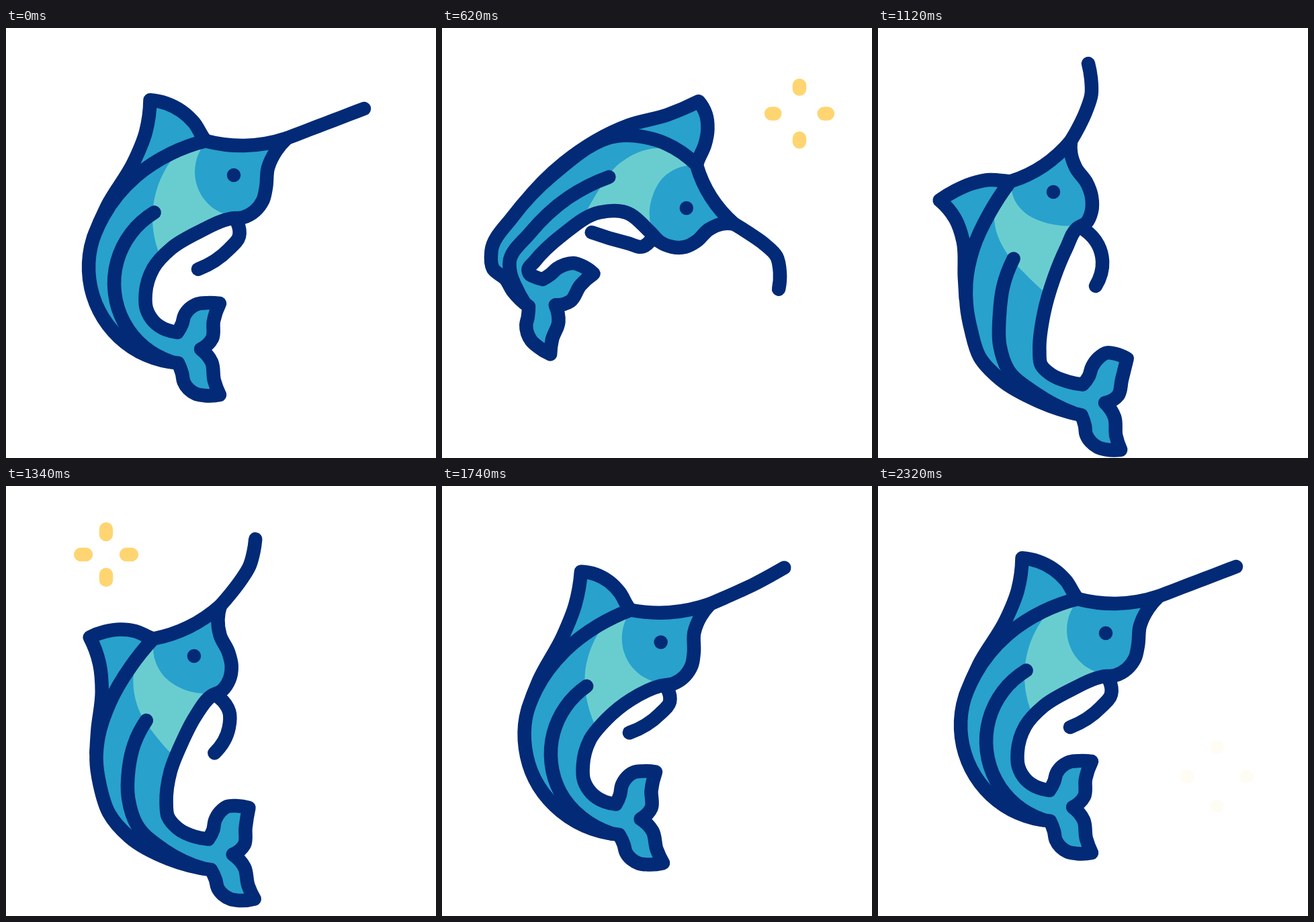
An HTML page with a canvas for the animation above (2.4 s loop, 640 by 640 pixels).

```html
<!DOCTYPE html>
<html lang="en">
<head>
<meta charset="utf-8">
<title>Leaping marlin</title>
<style>
  html, body { margin: 0; width: 100%; height: 100%; overflow: hidden; background: #fff; }
  canvas { display: block; width: 640px; height: 640px; }
</style>
</head>
<body>
<canvas id="stage" width="640" height="640"></canvas>
<script>
const NAVY = '#032a76', BLUE = '#28a1cd', CYAN = '#69cdd0', YELLOW = '#ffd572';
const LOOP = 2400, STEP = 20, LAST = 2320, STROKE = 20.5;
const PIVOT = [230, 360];
const ctx = document.getElementById('stage').getContext('2d');

const rad = deg => deg * Math.PI / 180;
const clamp = u => Math.max(0, Math.min(1, u));

function rotate([x, y], deg, [cx, cy] = [0, 0]) {
  const c = Math.cos(rad(deg)), s = Math.sin(rad(deg));
  return [cx + (x - cx) * c - (y - cy) * s, cy + (x - cx) * s + (y - cy) * c];
}

const spread = (n, f) => Array.from({ length: n }, (_, i) => f(i / (n - 1)));
const arc = (cx, cy, r, from, to, n = 5) => spread(n, u => {
  const a = rad(from + (to - from) * u);
  return [cx + r * Math.cos(a), cy + r * Math.sin(a)];
});

// The fish at rest: centre lines built from arcs and a few points.
const snout = [418, 164];
const shape = {
  brow: [[355, 175], [297, 168]],
  back: [[245, 187], [193, 221], ...arc(266, 356, 143, 212, 94, 7)],
  low: [...arc(295, 514, 33, 180, 90), [318, 546]],
  lowIn: [[310, 525], [306, 497], [290, 478]],
  upIn: [[307, 462], [309, 436], [318, 410]],
  up: [...arc(296, 443, 34, 275, 185), [255, 453]],
  belly: [...arc(255, 404, 48, 110, 190, 4), [219, 358], [246, 328], [288, 303],
    ...arc(339, 236, 48, 96, 2), [390, 208], [402, 183], snout],
  nose: spread(6, u => [418 + 115 * u, 164 - 44 * u]),
  finFront: arc(208, 200, 93, -24, -86),
  finRear: [[208, 155], [190, 200], [150, 266], [130, 312]],
  pec: [[344, 289], [347, 310], [332, 329], [286, 359]],
  side: arc(284, 380, 123, 239, 108, 7),
  band: arc(364, 283, 146, 224, 156),
  gill: arc(348, 214, 67, 98, 222, 6)
};

// Rigid groups around the eye and the tail notch.
const HEAD = [[0, 0], [-42, -51], [-4, 65], [48, 16]];
const TAIL = [[0, 0], [28, 68], [28, -68], [-34, -24], [-34, 21]];

// A pose is a set of pins, with the turn of head and tail in degrees.
const pose = (turns, ...pins) => ({ turns, pins });
const body = (...pins) => pins;

const rest = pose([0, 0], [339, 219], [290, 478],
  ...body([180, 232], [123, 356], [167, 460], [246, 328], [208, 400]),
  [215, 107], [286, 359], snout, [495, 135], [533, 120]);
const dive = pose([59, 29], [364, 274], [165, 397],
  ...body([250, 157], [80, 312], [92, 366], [223, 267], [131, 335]),
  [404, 113], [215, 292], [432, 306], [495, 375], [489, 420]);
const lift = pose([35, 26], [353, 247], [182, 445],
  ...body([208, 184], [86, 338], [98, 398], [240, 290], [143, 383]),
  [316, 97], [237, 328], [428, 248], [500, 273], [510, 303]);
const rise = pose([-37, 4], [261, 244], [338, 558],
  ...body([137, 340], [136, 435], [180, 522], [262, 372], [241, 485]),
  [92, 256], [324, 384], [287, 168], [319, 91], [313, 53]);
const sink = pose([-18, -11], [297, 264], [328, 539],
  ...body([157, 325], [132, 420], [176, 521], [256, 391], [231, 470]),
  [158, 198], [292, 400], [350, 194], [408, 140], [429, 107]);

// The last few pins are the fin tips and the nose.
const withTips = (p, ...tips) => pose(p.turns, ...p.pins.slice(0, -tips.length), ...tips);
const settle = withTips(rest, [227, 104], [279, 354], [418, 167], [496, 141], [535, 126]);
settle.turns = [0, -2];
const apex = withTips(
  pose(rise.turns.map(a => a - 3), ...rise.pins.map(p => rotate(p, -3, [330, 600]))),
  [265, 170], [284, 82], [286, 34]);

// Pins are blended in the frame of the head, so that the body swings in arcs.
const keys = [
  [0, rest], [120, rest], [360, dive], [860, lift], [1060, apex], [1120, rise],
  [1560, sink], [1840, settle], [2000, settle], [2280, rest], [LOOP, rest]
].map(([t, { turns, pins }]) => ({
  t, v: [...turns, ...pins.flatMap(p => rotate(p, -turns[0], PIVOT))]
}));

// Monotone slopes: smooth through the keys, no overshoot.
keys.forEach((k, i) => {
  const p = keys[i - 1], n = keys[i + 1];
  k.m = k.v.map((v, j) => {
    if (!p || !n) return 0;
    const h0 = k.t - p.t, h1 = n.t - k.t;
    const d0 = (v - p.v[j]) / h0, d1 = (n.v[j] - v) / h1;
    return d0 * d1 <= 0 ? 0 : 3 * (h0 + h1) / ((2 * h1 + h0) / d0 + (h1 + 2 * h0) / d1);
  });
});

function poseAt(t) {
  const i = keys.findIndex(k => k.t > t);
  const a = keys[i - 1], b = keys[i], h = b.t - a.t, u = (t - a.t) / h;
  const w = u * u * (3 - 2 * u), wa = u * (1 - u) * (1 - u) * h, wb = u * u * (u - 1) * h;
  const mix = a.v.map((v, j) => v + (b.v[j] - v) * w + a.m[j] * wa + b.m[j] * wb);
  const pins = [];
  for (let j = 2; j < mix.length; j += 2) pins.push(rotate([mix[j], mix[j + 1]], mix[0], PIVOT));
  return pose(mix.slice(0, 2), ...pins);
}

function handles({ turns, pins: [eye, notch, ...loose] }) {
  const rigid = (group, [x, y], deg) => group.map(([dx, dy]) => rotate([x + dx, y + dy], deg, [x, y]));
  return [...rigid(HEAD, eye, turns[0]), ...rigid(TAIL, notch, turns[1]), ...loose];
}

// Gauss-Jordan elimination; each row ends with two right-hand sides.
function solve(rows) {
  const n = rows.length;
  for (let c = 0; c < n; c++) {
    let best = c;
    for (let r = c + 1; r < n; r++) if (Math.abs(rows[r][c]) > Math.abs(rows[best][c])) best = r;
    [rows[c], rows[best]] = [rows[best], rows[c]];
    for (let r = 0; r < n; r++) {
      if (r === c) continue;
      const f = rows[r][c] / rows[c][c];
      for (let k = c; k < n + 2; k++) rows[r][k] -= f * rows[c][k];
    }
  }
  return rows.map((row, i) => [row[n] / row[i], row[n + 1] / row[i]]);
}

// Thin-plate spline that carries the handles from one place to another.
function warp(from, to) {
  const basis = ([x, y]) => [...from.map(([px, py]) => {
    const d = (x - px) ** 2 + (y - py) ** 2;
    return d ? d * Math.log(d) : 0;
  }), 1, x, y];
  const flat = f => [...from.map(f), 0, 0, 0, 0, 0];
  const weights = solve([
    ...from.map((p, i) => [...basis(p), ...to[i]]),
    flat(() => 1), flat(p => p[0]), flat(p => p[1])
  ]);
  return p => basis(p).reduce(([x, y], b, i) =>
    [x + b * weights[i][0], y + b * weights[i][1]], [0, 0]);
}

// Adds a smooth curve through the points; the path is already at the first one.
function curve(path, pts) {
  const n = pts.length - 1, d = [], v = [], m = [];
  for (let i = 0; i < n; i++) {
    const x = pts[i + 1][0] - pts[i][0], y = pts[i + 1][1] - pts[i][1];
    d[i] = Math.hypot(x, y) || 1;
    v[i] = [x / d[i], y / d[i]];
  }
  for (let i = 1; i < n; i++)
    m[i] = [0, 1].map(c => (v[i - 1][c] * d[i] + v[i][c] * d[i - 1]) / (d[i - 1] + d[i]));
  m[0] = [0, 1].map(c => 2 * v[0][c] - m[1][c]);
  m[n] = [0, 1].map(c => 2 * v[n - 1][c] - m[n - 1][c]);
  for (let i = 0; i < n; i++) {
    const p = pts[i], q = pts[i + 1], s = d[i] / 3;
    path.bezierCurveTo(p[0] + m[i][0] * s, p[1] + m[i][1] * s,
      q[0] - m[i + 1][0] * s, q[1] - m[i + 1][1] * s, q[0], q[1]);
  }
}

// Joins runs of points with corners between them.
function trace(start, ...runs) {
  const path = new Path2D();
  path.moveTo(...start);
  for (const run of runs) {
    curve(path, [start, ...run]);
    start = run[run.length - 1];
  }
  return path;
}

const line = ([first, ...others]) => trace(first, others);

function fill(path, color) {
  ctx.fillStyle = color;
  ctx.fill(path);
}

const restHandles = handles(rest);

function drawFish(now) {
  const move = warp(restHandles, handles(now));
  const p = {};
  for (const part in shape) p[part] = shape[part].map(move);

  const outline = trace(p.nose[0], p.brow, p.back, p.low, p.lowIn, p.upIn, p.up, p.belly);
  outline.closePath();
  const fin = trace(p.brow[1], p.finFront, p.finRear);
  const band = line(p.band);
  band.lineTo(...p.gill[0]);
  curve(band, p.gill);

  ctx.lineWidth = STROKE;
  ctx.strokeStyle = NAVY;
  fill(fin, BLUE);
  ctx.stroke(fin);
  fill(outline, BLUE);
  ctx.save();
  ctx.clip(outline);
  fill(band, CYAN);
  ctx.restore();
  for (const path of [outline, line(p.side), line(p.pec), line(p.nose)]) ctx.stroke(path);

  const eye = new Path2D();
  eye.arc(...now.pins[0], STROKE / 2, 0, 7);
  fill(eye, NAVY);
}

const sparkles = [[370, 532, 127.5], [1140, 149, 102], [1860, 504.5, 432.5]];
const reach = ms => 44 * (1 - (1 - clamp(ms / 320)) ** 2);

function drawSparkle(ms, x, y) {
  const alpha = clamp((477 - ms) / 210);
  if (ms <= 0 || !alpha) return;
  const near = reach(ms - 60), far = reach(ms) + 0.01;
  const rays = new Path2D();
  for (const [dx, dy] of [[1, 0], [0, 1], [-1, 0], [0, -1]]) {
    rays.moveTo(x + dx * near, y + dy * near);
    rays.lineTo(x + dx * far, y + dy * far);
  }
  ctx.globalAlpha = alpha;
  ctx.strokeStyle = YELLOW;
  ctx.lineWidth = STROKE * clamp(ms / 60);
  ctx.stroke(rays);
  ctx.globalAlpha = 1;
}

ctx.lineCap = ctx.lineJoin = 'round';
const begin = performance.now();

function draw() {
  const now = Math.max(0, performance.now() - begin) % LOOP;
  const t = Math.min(LAST, Math.floor(now / STEP) * STEP);
  ctx.fillStyle = '#fff';
  ctx.fillRect(0, 0, 640, 640);
  for (const [start, x, y] of sparkles) drawSparkle(t - start, x, y);
  drawFish(poseAt(t));
  requestAnimationFrame(draw);
}
draw();
</script>
</body>
</html>
```
